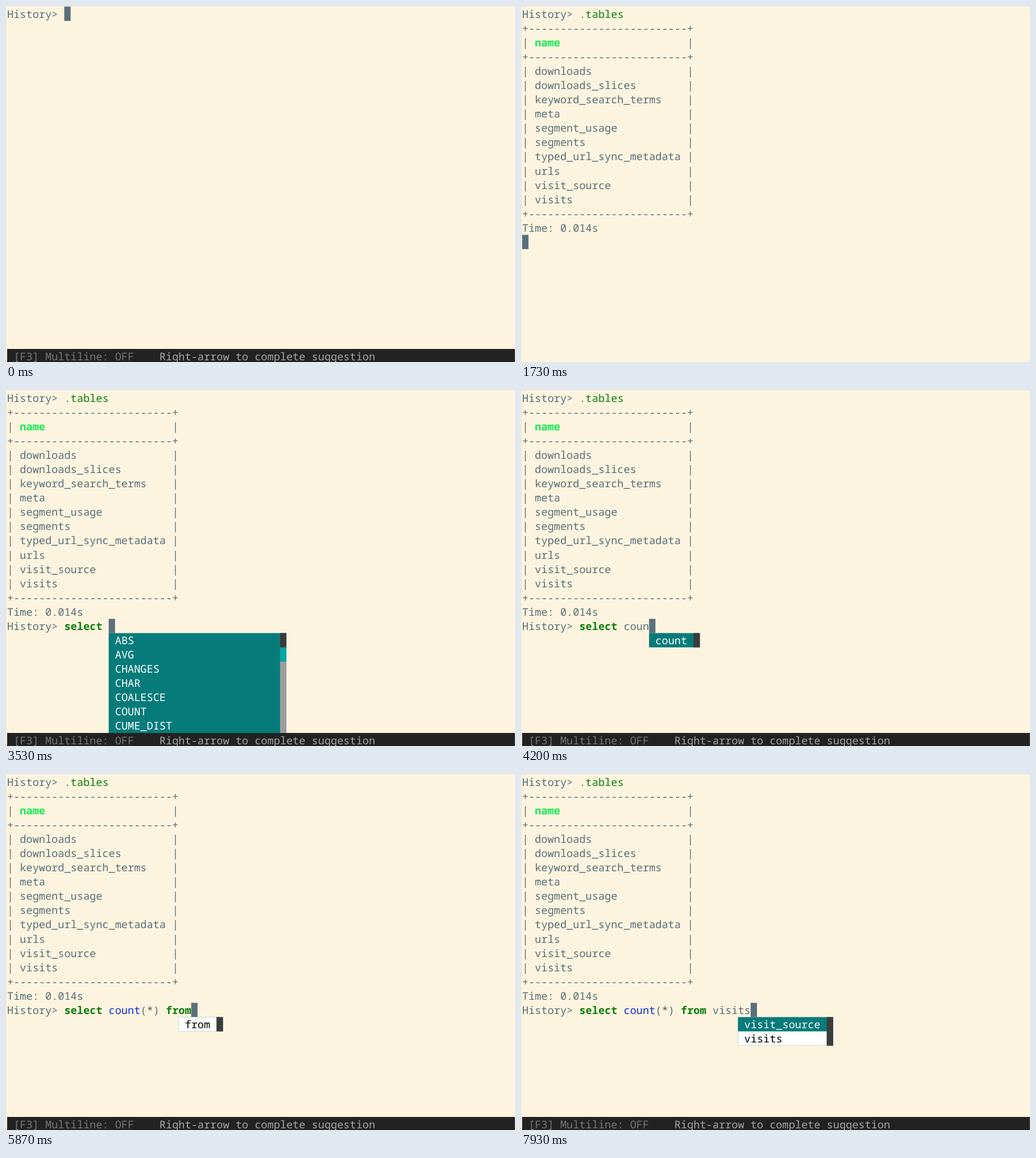
An HTML page for the animation above (8 s loop, 895x626 px).

```html
<!DOCTYPE html>
<html lang="en">
<head>
<meta charset="utf-8">
<title>SQL prompt</title>
<style>
html, body { margin: 0; width: 100%; height: 100%; overflow: hidden; background: #fdf4df; }
svg { display: block; width: 895px; height: 626px; }
text {
  font: 18.6px "Noto Sans Mono", "DejaVu Sans Mono", monospace;
  white-space: pre;
  text-rendering: geometricPrecision;
}
.bold { font-weight: 600; }
</style>
</head>
<body>
<svg id="screen" viewBox="0 0 895 626"></svg>
<script>
const LOOP = 8000, CELL_W = 11.16, CELL_H = 25.08;
const C = {
  bg: '#fdf4df', edge: '#f1ead9', fg: '#586e78', cursor: '#5a707c',
  green: '#0b7d0b', head: '#12ee4e', blue: '#0c2ddc', op: '#555555',
  menu: '#067b7a', thumb: '#3b3b3b', tip: '#00a5a5', track: '#9c9c9c',
  bar: '#222222', off: '#777777', hint: '#a6a6a6', bracket: '#aacccc'
};
const PROMPT = 'History> ', START = PROMPT.length;
const TABLES = ['downloads', 'downloads_slices', 'keyword_search_terms', 'meta', 'segment_usage',
  'segments', 'typed_url_sync_metadata', 'urls', 'visit_source', 'visits'];

// Menu: column, items, selected row, longest entry, rows covered by the scroll thumb
const menu = (col, list, pick = -1, longest, thumb) => {
  const items = list.split(' ');
  return {
    col, items, pick,
    width: (longest || Math.max(...items.map(s => s.length))) + 2,
    thumb: thumb || items.length
  };
};
const keywords = col => menu(col, 'ABORT ACTION ADD AFTER ALL ALTER ANALYZE', -1, 17, 1);
const visits = (col, pick) => menu(col, 'visit_source visits', pick);

// Time, phase (0 first prompt, 1 output only, 2 second prompt), typed text, menu
const STEPS = [
  [0, 0, ''],
  [400, 0, '.', menu(10, '.databases .mode .open .schema .tables')],
  [670, 0, '.t', menu(11, '.tables')],
  [740, 0, '.ta', menu(12, '.tables')],
  [800, 0, '.tab', menu(13, '.tables')],
  [1000, 0, '.tabl', menu(14, '.tables')],
  [1130, 0, '.tables', menu(14, '.tables', 0)],
  [1470, 0, '.tables'],
  [1730, 1, ''],
  [1800, 2, ''],
  [2530, 2, 's', menu(10, 'savepoint select set smallint source system')],
  [2730, 2, 'se', menu(11, 'select set')],
  [2800, 2, 'sel', menu(12, 'select')],
  [2870, 2, 'sele'],
  [2930, 2, 'sele', menu(13, 'select')],
  [3070, 2, 'select', menu(13, 'select', 0)],
  [3530, 2, 'select ', menu(16, 'ABS AVG CHANGES CHAR COALESCE COUNT CUME_DIST', -1, 25, 1)],
  [3930, 2, 'select c', menu(17, 'changes char coalesce count cume_dist cascade case', -1, 17, 2)],
  [4000, 2, 'select co', menu(18, 'coalesce count collate column commit conflict constraint')],
  [4130, 2, 'select cou', menu(19, 'count')],
  [4200, 2, 'select coun', menu(20, 'count')],
  [4400, 2, 'select count', menu(20, 'count', 0)],
  [4670, 2, 'select count('],
  [4800, 2, 'select count(*'],
  [4930, 2, 'select count(*)', keywords(24)],
  [5130, 2, 'select count(*) ', keywords(25)],
  [5400, 2, 'select count(*) f', menu(26, 'fail float for foreign from full')],
  [5530, 2, 'select count(*) fr', menu(27, 'from')],
  [5870, 2, 'select count(*) from', menu(27, 'from', 0)],
  [6270, 2, 'select count(*) from ', menu(30, TABLES.slice(0, 7).join(' '), -1, 23, 4)],
  [6870, 2, 'select count(*) from vi', visits(32)],
  [7000, 2, 'select count(*) from vis', visits(33)],
  [7070, 2, 'select count(*) from visi', visits(34)],
  [7470, 2, 'select count(*) from visit_source', visits(34, 0)],
  [7670, 2, 'select count(*) from visits', visits(34, 1)]
];

const px = col => 2 + col * CELL_W;
const py = row => 1.12 + row * CELL_H;
const rect = (x, y, w, h, fill) => `<rect x="${x}" y="${y}" width="${w}" height="${h}" fill="${fill}"/>`;
const block = (col, row, w, h, fill) => rect(px(col), py(row), w * CELL_W, h * CELL_H, fill);
const escape = s => s.replace(/&/g, '&amp;').replace(/</g, '&lt;').replace(/>/g, '&gt;');

function put(col, row, str, fill = C.fg, bold = false) {
  return `<text x="${px(col).toFixed(2)}" y="${(py(row) + 19.5).toFixed(2)}" fill="${fill}"` +
    `${bold ? ' class="bold"' : ''}>${escape(str)}</text>`;
}

function inputLine(row, str) {
  let out = put(0, row, PROMPT.trim());
  const matched = str.endsWith(')');
  for (const m of str.matchAll(/\w+|[^\w\s]/g)) {
    const word = m[0], col = START + m.index;
    const keyword = word === 'select' || word === 'from';
    let fill = C.fg;
    if (keyword || word === 'tables') fill = C.green;
    else if (word === 'count' && str[m.index + 5] === '(') fill = C.blue;
    else if (word === '*') fill = C.op;
    else if (matched && /[()]/.test(word)) {
      out += block(col, row, 1, 1, C.bracket);
      fill = '#000';
    }
    out += put(col, row, word, fill, keyword);
  }
  return out;
}

function results() {
  const rule = '+' + '-'.repeat(25) + '+';
  const sides = row => put(0, row, '|') + put(26, row, '|');
  return put(0, 1, rule) + sides(2) + put(2, 2, 'name', C.head, true) + put(0, 3, rule) +
    TABLES.map((name, i) => sides(4 + i) + put(2, 4 + i, name)).join('') +
    put(0, 14, rule) + put(0, 15, 'Time: 0.014s');
}

function drawMenu(row, m) {
  const rows = m.items.length, end = m.col + m.width;
  let out = block(m.col, row, m.width + 1, rows, C.menu);
  m.items.forEach((item, i) => {
    const on = i === m.pick;
    if (on) out += block(m.col, row + i, m.width, 1, '#fff');
    out += put(m.col + 1, row + i, item, on ? '#000' : '#fff');
  });
  if (m.thumb < rows) {
    out += block(end, row, 1, rows, C.track) + block(end, row, 1, m.thumb + 1, C.tip);
  }
  return out + block(end, row, 1, m.thumb, C.thumb);
}

function toolbar() {
  return block(0, 24, 80, 1, C.bar) + put(1, 24, '[F3] Multiline: OFF', C.off) +
    put(24, 24, 'Right-arrow to complete suggestion', C.hint);
}

function draw([, phase, str, list]) {
  const row = phase ? 16 : 0;
  let out = rect(0, 0, 895, 626, C.bg) + rect(0, 0, 895, 1, C.edge) + rect(0, 0, 1, 626, C.edge);
  if (phase) out += inputLine(0, '.tables') + results();
  if (phase !== 1) out += inputLine(row, str) + toolbar();
  out += block(phase === 1 ? 0 : START + str.length, row, 1, 1, C.cursor);
  if (list) out += drawMenu(row + 1, list);
  return out;
}

const screen = document.getElementById('screen');
let shown = null;
function tick() {
  const t = performance.now() % LOOP;
  const step = STEPS.findLast(s => s[0] <= t);
  if (step !== shown) {
    shown = step;
    screen.innerHTML = draw(step);
  }
  requestAnimationFrame(tick);
}
tick();
</script>
</body>
</html>
```
